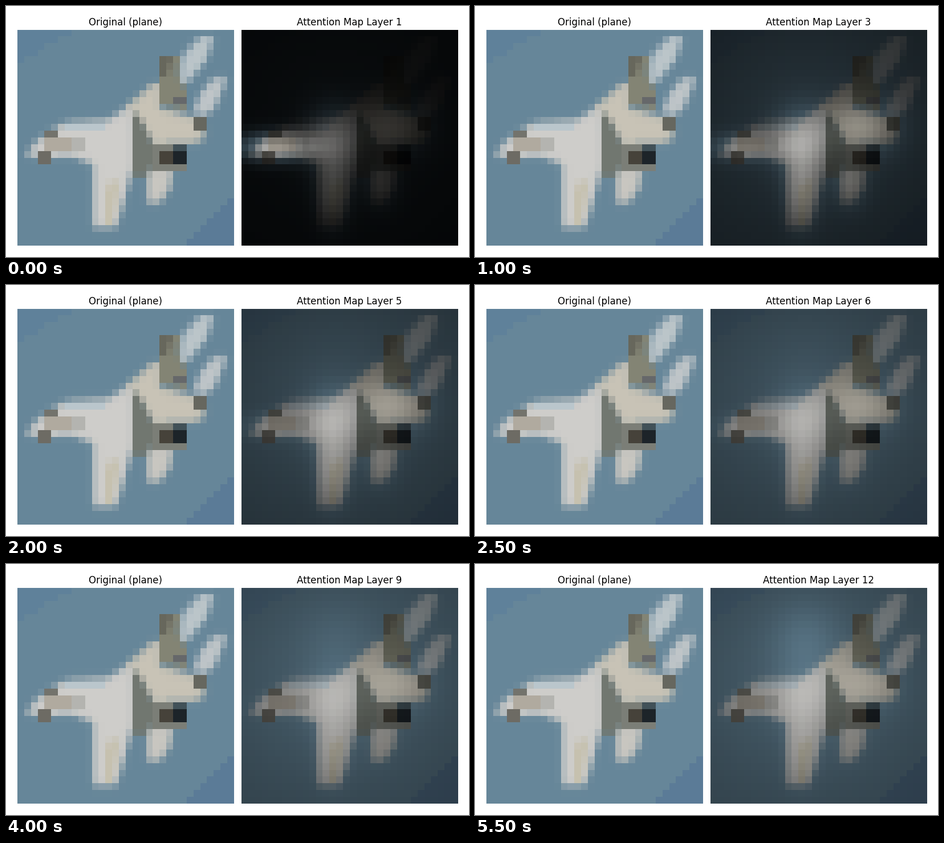
A matplotlib script that plays this animation: 812x441 px, repeating every 6000 ms.

```python
import numpy as np
import matplotlib.pyplot as plt
from matplotlib.animation import FuncAnimation
from matplotlib.colors import to_rgb
from matplotlib.path import Path

WIDTH, HEIGHT, DPI = 812, 441, 100
CELLS, SUB = 32, 6
LAYERS = 12

x, y = np.meshgrid(np.arange(CELLS) + 0.5, np.arange(CELLS) + 0.5)
fine = (np.arange(CELLS * SUB) + 0.5) / SUB
points = np.stack(np.meshgrid(fine, fine), axis=-1).reshape(-1, 2)


def box(x0, y0, x1, y1):
    return [(x0, y0), (x1, y0), (x1, y1), (x0, y1)]


def paint(image, color, outline, soft=0.0):
    """Blend a flat polygon into the coarse image by cell coverage."""
    inside = Path(outline).contains_points(points)
    cover = inside.reshape(CELLS, SUB, CELLS, SUB).mean(axis=(1, 3))
    around = sum(np.roll(cover, step, axis) for step in (-1, 1) for axis in (0, 1)) / 4
    cover = ((1 - soft) * cover + soft * around)[..., None]
    image[:] = image * (1 - cover) + np.array(to_rgb(color)) * cover


SILHOUETTE = [
    # tail fins
    ("#bcc6ca", [(27, 1), (29, 1), (28, 4.5), (25, 8), (24, 8), (24.3, 4)]),
    ("#c0c6c9", [(29, 7.2), (31, 7.2), (29, 12), (27, 13), (26, 12), (27, 9.5)]),
    # nose, body and left wing
    ("#cecdca", [(1.1, 18.6), (3, 16.4), (7, 13.8), (13.5, 13.4), (17, 11), (17.2, 20),
                 (15, 28), (14.5, 29.4), (11.2, 29.4), (11.2, 20), (8, 18.8), (4, 19)]),
    # right body and small wing
    ("#c8c3b6", [(16, 11.5), (20, 8), (21, 8), (21, 11.6), (26, 13), (27.8, 14.8),
                 (27.2, 16.7), (20, 17), (17.5, 13)]),
    ("#c9c7c1", [(19.2, 20.5), (23, 20.5), (22.6, 23.5), (21, 25.7), (19.2, 25.7)]),
]

DETAILS = [
    ("#bac6cc", box(7, 14, 13, 15)),
    ("#b0aa9f", box(4, 16, 8, 18)),
    ("#b4b4b0", box(8, 16, 10, 18)),
    ("#73736c", box(4, 15, 6, 16)),
    ("#6d6b64", box(3, 18, 5, 20)),
    ("#c6c1af", [(14, 22), (15, 23), (14, 29), (13, 29), (13, 24)]),
    # dark fin, its shadow and the rear edge
    ("#838474", [(21, 4), (24, 4), (23.7, 7), (25, 9), (25, 12), (21, 11)]),
    ("#67675c", [(21, 4), (23, 4), (22, 7), (21, 7)]),
    ("#66686a", box(23, 10, 25, 11)),
    ("#66675f", box(26, 13, 28, 15)),
    # stripe behind the wing and the intake
    ("#717770", [(17, 12.5), (18, 13), (20, 17), (20, 20), (19, 21.8), (17, 21.8)]),
    ("#7b7e77", box(20, 17, 25, 21)),
    ("#46423a", box(21, 18, 23, 20)),
    ("#415158", box(23, 17, 25, 18)),
    ("#1d2429", box(23, 18, 25, 20)),
]


def photo():
    image = np.tile(np.array(to_rgb("#668699")), (CELLS, CELLS, 1))
    image[x / 9 + y / 5 < 1] = to_rgb("#5f819a")
    image[x + y > 56.5] = to_rgb("#5b7b97")
    for color, outline in SILHOUETTE:
        paint(image, color, outline, soft=0.22)
    for color, outline in DETAILS:
        paint(image, color, outline)
    return image


def bump(cx, cy, sx, sy):
    return np.exp(-((x - cx) / sx) ** 2 / 2 - ((y - cy) / sy) ** 2 / 2)


def attention(layer):
    """Starts at the nose, moves to the body, then spreads over the sky."""
    rise = np.sin(np.pi / 2 * min(1, (layer - 1) / 8))
    nose = np.exp(-(layer - 1) / 2.5)
    focus = np.exp(-((layer - 3) / 2.5) ** 2)
    late = (layer / LAYERS) ** 3

    mask = 0.05 + 0.43 * rise
    mask = mask + (0.04 + 0.16 * np.sqrt(rise)) * bump(14, 13, 13, 12)
    mask += 0.17 * late * bump(14, 8, 3.5, 4)
    mask += 0.8 * nose * bump(5, 17.4, 3.8, 1.4)
    mask += (0.19 + 0.23 * focus) * bump(13.5, 16.5, 2.8, 3.4)
    mask += (0.18 * rise + 0.32 * focus) * bump(22, 14.5, 3.6, 2.8)
    mask += (0.12 + 0.15 * focus) * bump(13.5, 24, 1.8, 3.5)
    mask += (0.04 + 0.16 * focus) * bump(20.5, 22.5, 1.8, 2.6)
    return np.clip(mask, 0, 1)[..., None]


def panel(left, image):
    ax = fig.add_axes([left / WIDTH, 20 / HEIGHT, 379 / WIDTH, 379 / HEIGHT])
    ax.axis("off")
    heading = ax.set_title("", fontsize=12, fontfamily="DejaVu Sans")
    return ax.imshow(image, interpolation="nearest", aspect="auto"), heading


# The tiny margin keeps the pixel size from rounding down.
fig = plt.figure(figsize=((WIDTH + 1e-6) / DPI, (HEIGHT + 1e-6) / DPI),
                 dpi=DPI, facecolor="white")
plane = photo()
_, plane_title = panel(20, plane)
plane_title.set_text("Original (plane)")
heat, heat_title = panel(413, plane)


def update(frame):
    layer = frame + 1
    heat.set_data(plane * attention(layer))
    heat_title.set_text(f"Attention Map Layer {layer}")
    return heat, heat_title


anim = FuncAnimation(fig, update, frames=LAYERS, interval=500, repeat=True,
                     repeat_delay=0, blit=False)
plt.show()
```
